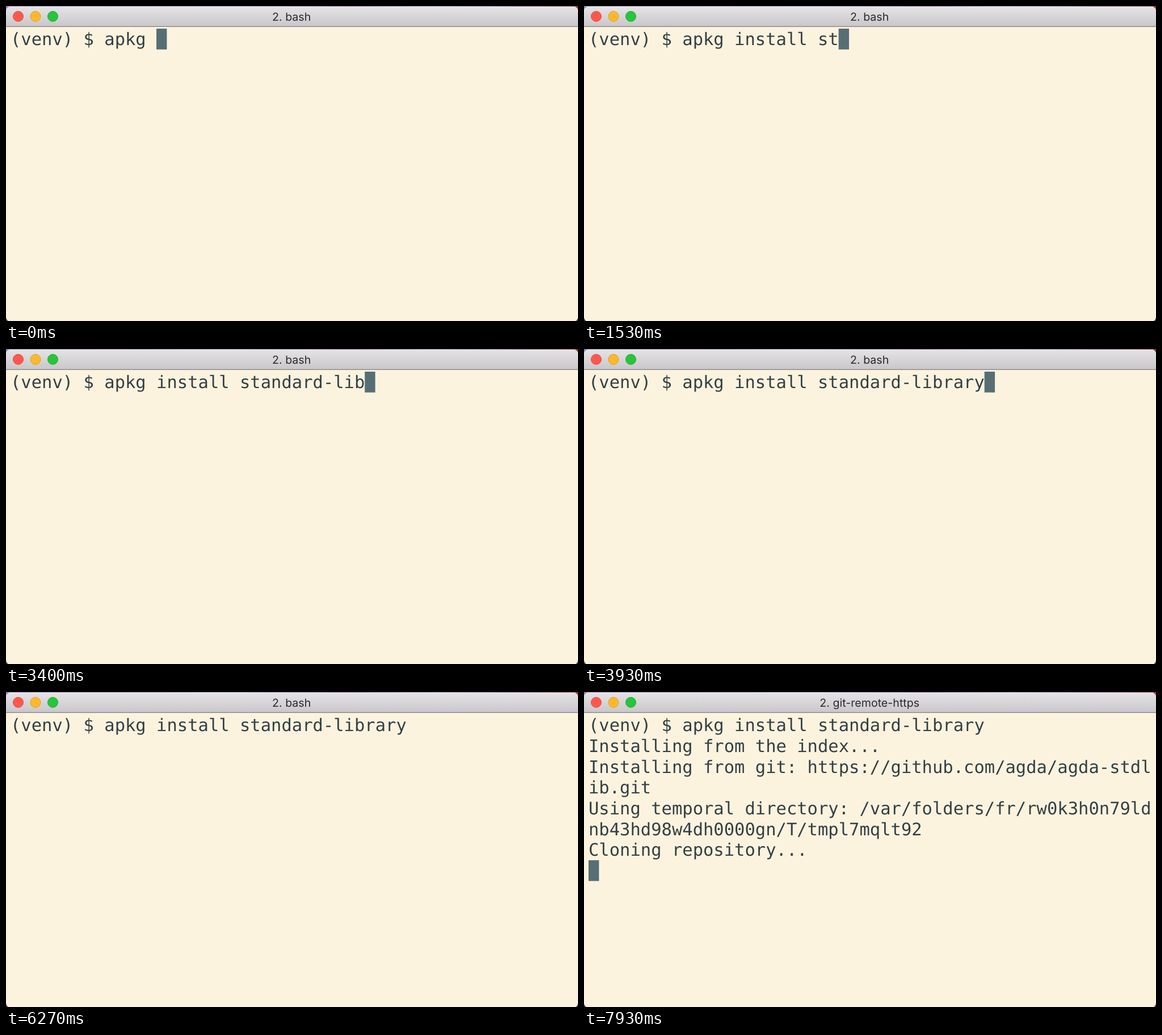
Animation, 1008 px wide and 556 px high, one loop 8000 ms. Source, as an HTML page:

```html
<!DOCTYPE html>
<html lang="en">
<head>
<meta charset="utf-8">
<title>Terminal</title>
<style>
  html, body { margin: 0; width: 100%; height: 100%; overflow: hidden; background: #fcf3df; }
  svg { display: block; width: 100vw; height: 100vh; }
  text { white-space: pre; text-rendering: geometricPrecision; }
  #title { font: 19.6px Inter, Roboto, sans-serif; fill: #2b292b; text-anchor: middle; }
  #screen { font: 30.5px "DejaVu Sans Mono", monospace; fill: #334044; }
</style>
</head>
<body>
<svg viewBox="0 0 1008 556">
  <defs>
    <linearGradient id="bar" x1="0" y1="0" x2="0" y2="1">
      <stop offset="0" stop-color="#e5e3e5"/>
      <stop offset="1" stop-color="#c9c7c9"/>
    </linearGradient>
    <linearGradient id="desk">
      <stop offset="0" stop-color="#8f7fb4"/>
      <stop offset=".2" stop-color="#8f79b0"/>
      <stop offset=".4" stop-color="#7f91b8"/>
      <stop offset=".6" stop-color="#7c5486"/>
      <stop offset=".75" stop-color="#7b86b4"/>
      <stop offset=".9" stop-color="#775080"/>
      <stop offset="1" stop-color="#8a3a30"/>
    </linearGradient>
    <clipPath id="window"><rect y="1" width="1008" height="556" rx="8"/></clipPath>
  </defs>
  <rect width="1008" height="40" fill="url(#desk)"/>
  <rect y="540" width="1008" height="16" fill="#3b3437"/>
  <g clip-path="url(#window)">
    <rect y="1" width="1008" height="556" fill="#fcf3df"/>
    <rect y="1" width="1008" height="35" fill="url(#bar)"/>
    <rect y="1" width="1008" height="1" fill="#f1eff1"/>
    <rect y="35.6" width="1008" height="1.4" fill="#8b888a"/>
  </g>
  <g>
    <circle cx="21.5" cy="18.3" r="9" fill="#ff574e" stroke="#e2463f"/>
    <circle cx="52" cy="18.3" r="9" fill="#fdb82b" stroke="#dfa023"/>
    <circle cx="82.5" cy="18.3" r="9" fill="#27c53b" stroke="#1dac2c"/>
  </g>
  <text id="title" x="503.2" y="26"></text>
  <rect id="cursor" width="18.4" height="36.7" fill="#586e75"/>
  <g id="screen"></g>
</svg>
<script>
const LOOP = 8000, LEFT = 8, TOP = 40, CELL = 18.36, ROW = 36.7, BLINK = 500;
const PROMPT = "(venv) $ apkg ";
const COMMAND = "install standard-library";
const keys = [200, 330, 470, 600, 700, 870, 1000, 1130, 1330, 1470, 1600, 1730,
  1870, 2000, 2130, 2270, 2670, 3000, 3200, 3330, 3470, 3600, 3730, 3930];
const ENTER = 7130;
const output = [
  [7600, "Installing from the index..."],
  [7670, "Installing from git: https://github.com/agda/agda-stdl"],
  [7670, "ib.git"],
  [7670, "Using temporal directory: /var/folders/fr/rw0k3h0n79ld"],
  [7670, "nb43hd98w4dh0000gn/T/tmpl7mqlt92"],
  [7730, "Cloning repository..."]
];
const titles = [[0, "2. bash"], [7270, "2. python3.6"], [7870, "2. git-remote-https"]];

const byId = id => document.getElementById(id);
const title = byId("title"), cursor = byId("cursor"), screen = byId("screen");

function addRow(row) {
  const el = document.createElementNS("http://www.w3.org/2000/svg", "text");
  el.setAttribute("x", LEFT);
  el.setAttribute("y", TOP + 29.2 + row * ROW);
  return screen.appendChild(el);
}
const rows = Array.from({ length: output.length + 1 }, (_, i) => addRow(i));

function setText(el, value) {
  if (el.textContent !== value) el.textContent = value;
}

const activity = [...keys, ENTER, ...output.map(([at]) => at)];

// The cursor stays solid for a moment after any activity, then blinks.
function cursorOn(t) {
  const last = Math.max(-BLINK, ...activity.filter(at => at <= t));
  return t - last < BLINK || Math.floor((t + 300) / BLINK) % 2 === 0;
}

function draw(t) {
  const line = PROMPT + COMMAND.slice(0, keys.filter(at => at <= t).length);
  const shown = output.filter(([at]) => at <= t).length;
  const entered = t >= ENTER;
  setText(rows[0], line);
  output.forEach(([, text], i) => setText(rows[i + 1], i < shown ? text : ""));
  setText(title, titles.filter(([at]) => at <= t).pop()[1]);
  cursor.setAttribute("x", LEFT + (entered ? 0 : line.length * CELL));
  cursor.setAttribute("y", TOP + (entered ? shown + 1 : 0) * ROW);
  cursor.setAttribute("visibility", cursorOn(t) ? "visible" : "hidden");
}

const start = performance.now();
function tick() {
  draw((performance.now() - start) % LOOP);
  requestAnimationFrame(tick);
}
tick();
</script>
</body>
</html>
```
